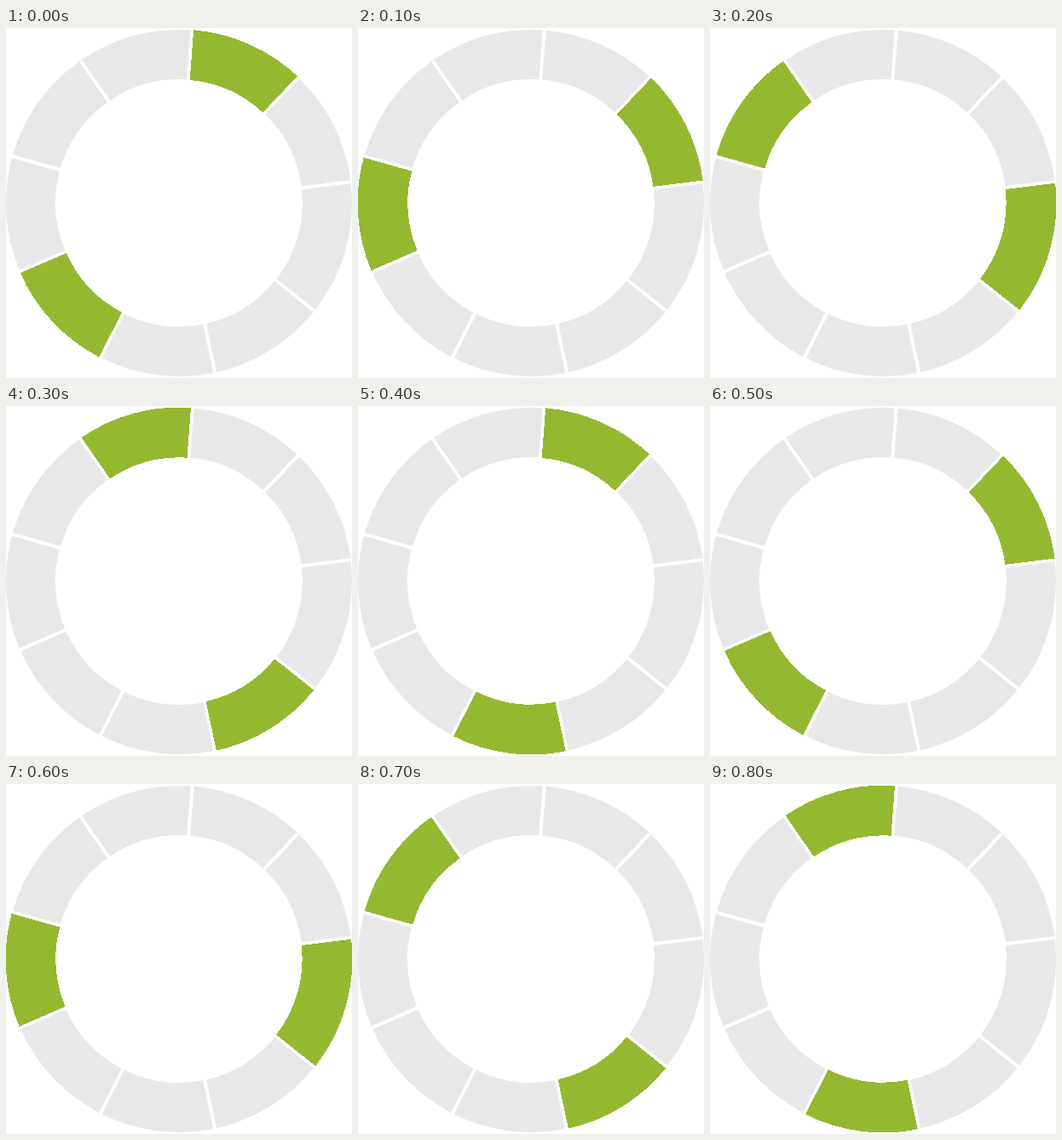
An HTML page that plays this animation: 406 px wide and 410 px high, repeating every 900 ms.

```html
<!DOCTYPE html>
<html lang="en">
<head>
<meta charset="utf-8">
<title>Segmented ring loader</title>
<style>
  html, body { margin: 0; height: 100%; overflow: hidden; background: #fff; }
  svg { display: block; }
  .idle { fill: #e8e8e8; }
  .lit { fill: #95b831; shape-rendering: crispEdges; }
</style>
</head>
<body>
<svg id="ring" width="406" height="410" viewBox="0 0 406 410"></svg>
<script>
const CENTER = { x: 203, y: 205 };
const OUTER = 203, INNER = 145, HALF_GAP = 2;
const STEP_MS = 100;
const LIT_GROWTH = 0.4; // lit segments reach slightly into the gaps

// Gap directions in degrees, clockwise from the top.
const gaps = [4.4, 43.5, 83, 128.5, 168, 207, 246.7, 285.6, 325.3];
const count = gaps.length;
const ring = document.getElementById("ring");

// Point on a circle, shifted sideways from the direction by a fixed distance.
function point(degrees, radius, shift) {
  const angle = degrees * Math.PI / 180 + Math.asin(shift / radius);
  const x = CENTER.x + radius * Math.sin(angle);
  const y = CENTER.y - radius * Math.cos(angle);
  return `${x.toFixed(2)} ${y.toFixed(2)}`;
}

function segmentPath(index, growth) {
  const start = gaps[index], end = gaps[(index + 1) % count];
  const outer = OUTER + growth, inner = INNER - growth;
  const shift = HALF_GAP - growth;
  return `M${point(start, outer, shift)}` +
    `A${outer} ${outer} 0 0 1 ${point(end, outer, -shift)}` +
    `L${point(end, inner, -shift)}` +
    `A${inner} ${inner} 0 0 0 ${point(start, inner, shift)}Z`;
}

const segments = gaps.map((_, index) => {
  const path = document.createElementNS("http://www.w3.org/2000/svg", "path");
  ring.append(path);
  return { path, idle: segmentPath(index, 0), lit: segmentPath(index, LIT_GROWTH) };
});

function draw(time) {
  const first = Math.floor(time / STEP_MS) % count;
  const second = (first + 5) % count;
  segments.forEach((segment, index) => {
    const state = index === first || index === second ? "lit" : "idle";
    segment.path.setAttribute("class", state);
    segment.path.setAttribute("d", segment[state]);
  });
}

const startTime = performance.now();
function tick() {
  draw(performance.now() - startTime);
  requestAnimationFrame(tick);
}
tick();
</script>
</body>
</html>
```
